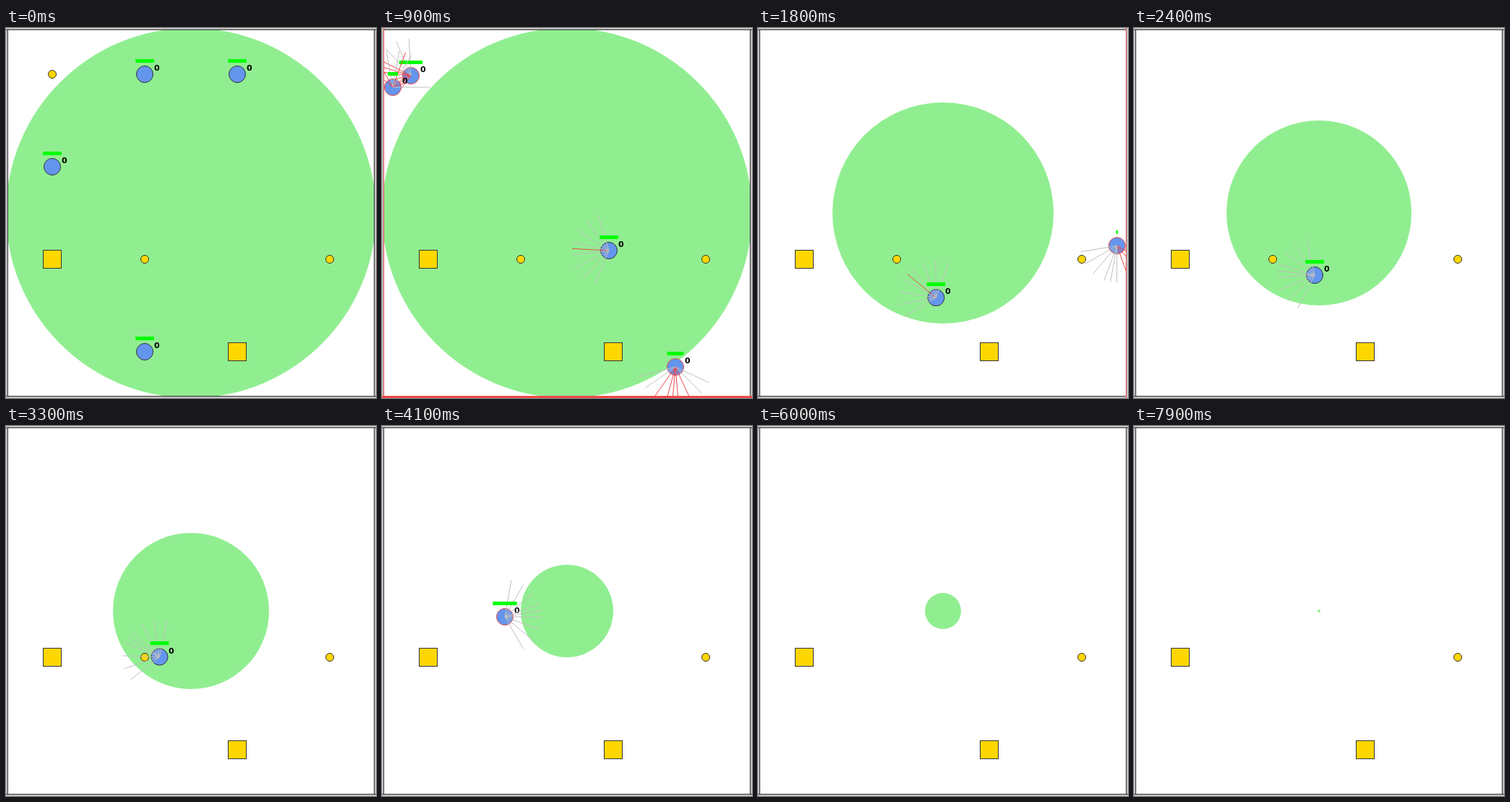
Write an HTML page with a canvas that moves like this. It is 512 by 512 pixels and loops after 8000 ms.

```html
<!DOCTYPE html>
<html lang="en">
<head>
<meta charset="utf-8">
<style>
html, body { margin: 0; width: 100%; height: 100%; overflow: hidden; background: #fff; }
canvas { display: block; }
</style>
</head>
<body>
<canvas id="stage" width="512" height="512"></canvas>
<script>
const ctx = document.getElementById('stage').getContext('2d');
const LOOP = 8000, STEP = 100, SIZE = 512, MID = 256;
const LOW = 2.5, HIGH = 509.5;
const BODY = 11.5, HALF_BOX = 12.5, REACH = 51.2;
const FULL = 25.6, BONUS = 10.24, DAMAGE = 0.05;
const FAN = [-70, -50, -30, -10, 0, 10, 30, 50, 70];
const INK = '#333', RED = '#f04848', SILVER = '#c0c0c0', GOLD = '#ffd700';

const boxes = [{ x: 64, y: 320 }, { x: 320, y: 448 }];
const coins = [{ x: 64, y: 64 }, { x: 192, y: 320 }, { x: 448, y: 320 }];
const walls = {
  left: { vertical: true, at: LOW }, right: { vertical: true, at: HIGH },
  top: { at: LOW }, bottom: { at: HIGH }
};

// Waypoints: time, x, y, heading in degrees. Shooting lasts from `from` to `to`.
const agents = [
  { from: 1000, to: 2000, path: [[0, 192, 64, 180], [700, 64, 64, 190], [900, 40, 66, 197], [1400, 39, 15, 78]] },
  { from: 0, to: 2000, path: [[0, 320, 64, 90], [900, 314, 308, 183], [1400, 244, 394, 241],
    [2400, 250, 342, 187], [3600, 200, 312, 220], [4100, 170, 264, 350], [4500, 131, 262, 260], [5400, 298, 400, 45]] },
  { from: 0, to: 1000, path: [[0, 64, 192, 270], [400, 20, 90, 280], [900, 15, 82, 290], [1400, 44, 98, 350]] },
  { from: 0, to: 1000, path: [[0, 192, 448, 20], [600, 410, 490, 70], [900, 406, 469, 95],
    [1400, 496, 346, 142], [1900, 497, 290, 90]] }
];

// The zone holds for a second, then shrinks for a second: to a half, a half, 0.4, nothing.
function zoneRadius(t) {
  return [0.5, 0.5, 0.4, 0].reduce((r, scale, i) => {
    const k = Math.min(1, Math.max(0, t / 1000 - 1 - 2 * i));
    return r * (1 + (scale - 1) * k);
  }, MID);
}

function poseAt(path, t) {
  const i = Math.max(1, path.findIndex(key => key[0] >= t));
  const last = path[path.length - 1];
  if (t >= last[0]) return { x: last[1], y: last[2], heading: last[3] };
  const a = path[i - 1], b = path[i];
  const k = (t - a[0]) / (b[0] - a[0]);
  const [, x, y, heading] = a.map((v, n) => v + (b[n] - v) * k);
  return { x, y, heading };
}

// Health falls with the distance outside the zone and grows with each coin.
function simulate() {
  const frames = [];
  const health = agents.map(() => FULL);
  let left = coins;
  for (let t = 0; t < LOOP; t += STEP) {
    const radius = zoneRadius(t);
    const alive = [];
    agents.forEach((agent, i) => {
      if (health[i] <= 0) return;
      const p = poseAt(agent.path, t);
      const beyond = Math.hypot(p.x - MID, p.y - MID) - radius;
      const rest = left.filter(c => Math.hypot(c.x - p.x, c.y - p.y) > BODY + 5.5);
      health[i] += BONUS * (left.length - rest.length) - DAMAGE * Math.max(0, beyond);
      left = rest;
      if (health[i] <= 0) return;
      alive.push({ ...p, health: health[i], outside: beyond > 0, shoots: t >= agent.from && t < agent.to });
    });
    frames.push({ radius, alive, coins: left });
  }
  return frames;
}

function circle(x, y, r, fill, stroke) {
  ctx.beginPath();
  ctx.arc(x, y, r, 0, Math.PI * 2);
  ctx.fillStyle = fill;
  ctx.fill();
  if (!stroke) return;
  ctx.strokeStyle = stroke;
  ctx.stroke();
}

function line(x1, y1, x2, y2, color) {
  ctx.beginPath();
  ctx.moveTo(x1, y1);
  ctx.lineTo(x2, y2);
  ctx.strokeStyle = color;
  ctx.stroke();
}

// Nearest wall, agent or box along a ray.
function castRay(p, dx, dy, alive) {
  let d = REACH, target = null;
  const meet = (dist, thing) => {
    if (dist < d) [d, target] = [Math.max(0, dist), thing];
  };
  if (dx) meet(((dx > 0 ? HIGH : LOW) - p.x) / dx, dx > 0 ? walls.right : walls.left);
  if (dy) meet(((dy > 0 ? HIGH : LOW) - p.y) / dy, dy > 0 ? walls.bottom : walls.top);
  for (const o of alive) {
    const ox = o.x - p.x, oy = o.y - p.y;
    const along = ox * dx + oy * dy;
    const gap = BODY ** 2 - (ox * dy - oy * dx) ** 2;
    if (o !== p && along > 0 && gap > 0) meet(along - Math.sqrt(gap), o);
  }
  for (const box of boxes) {
    const xs = [-HALF_BOX, HALF_BOX].map(s => (box.x + s - p.x) / dx);
    const ys = [-HALF_BOX, HALF_BOX].map(s => (box.y + s - p.y) / dy);
    const near = Math.max(Math.min(...xs), Math.min(...ys));
    const far = Math.min(Math.max(...xs), Math.max(...ys));
    if (near > 0 && near < far) meet(near, box);
  }
  return { d, target };
}

function castFan(p, alive) {
  return FAN.map(turn => {
    const angle = (p.heading + turn) * Math.PI / 180;
    const dx = Math.cos(angle), dy = Math.sin(angle);
    const { d, target } = castRay(p, dx, dy, alive);
    const shot = turn === 0 && p.shoots;
    if (target) {
      target.seen = true;
      target.shot = target.shot || shot;
    }
    return { x: p.x + dx * d, y: p.y + dy * d, color: target || shot ? RED : SILVER };
  });
}

function drawWall(wall) {
  const { vertical, at, seen, shot } = wall;
  const start = at === LOW ? 0 : SIZE - 2;
  ctx.fillStyle = shot ? RED : SILVER;
  if (vertical) ctx.fillRect(start, 0, 2, SIZE);
  else ctx.fillRect(0, start, SIZE, 2);
  const color = seen ? RED : INK;
  if (vertical) line(at, 0, at, SIZE, color);
  else line(0, at, SIZE, at, color);
}

function drawBox({ x, y, seen }) {
  const corner = [x - HALF_BOX, y - HALF_BOX, HALF_BOX * 2, HALF_BOX * 2];
  ctx.fillStyle = GOLD;
  ctx.strokeStyle = seen ? RED : INK;
  ctx.fillRect(...corner);
  ctx.strokeRect(...corner);
}

function drawAgent(p, rays) {
  circle(p.x, p.y, BODY, '#6495ed', p.outside ? RED : INK);
  ctx.fillStyle = '#000';
  ctx.fillText('0', Math.round(p.x + 12.5), Math.round(p.y - 5));
  for (const ray of rays) line(p.x, p.y, ray.x, ray.y, ray.color);
  ctx.fillStyle = '#0f0';
  ctx.fillRect(p.x - p.health / 2, Math.round(p.y - 21.5), p.health, 5);
}

function draw({ radius, alive, coins }, first) {
  const sides = Object.values(walls);
  for (const thing of [...sides, ...boxes]) thing.seen = thing.shot = false;
  const fans = alive.map(p => first ? [] : castFan(p, alive));

  ctx.fillStyle = '#fff';
  ctx.fillRect(0, 0, SIZE, SIZE);
  circle(MID, MID, Math.floor(radius), '#90ee90');
  boxes.forEach(drawBox);
  for (const { x, y } of coins) circle(x, y, 5.5, GOLD, INK);
  alive.forEach((p, i) => drawAgent(p, fans[i]));
  sides.sort((a, b) => a.seen - b.seen).forEach(drawWall);
}

ctx.font = 'bold 11px "DejaVu Sans", sans-serif';
const frames = simulate();
const begin = performance.now();

function tick() {
  const n = Math.floor((performance.now() - begin) % LOOP / STEP);
  draw(frames[n], n === 0);
  requestAnimationFrame(tick);
}
tick();
</script>
</body>
</html>
```
